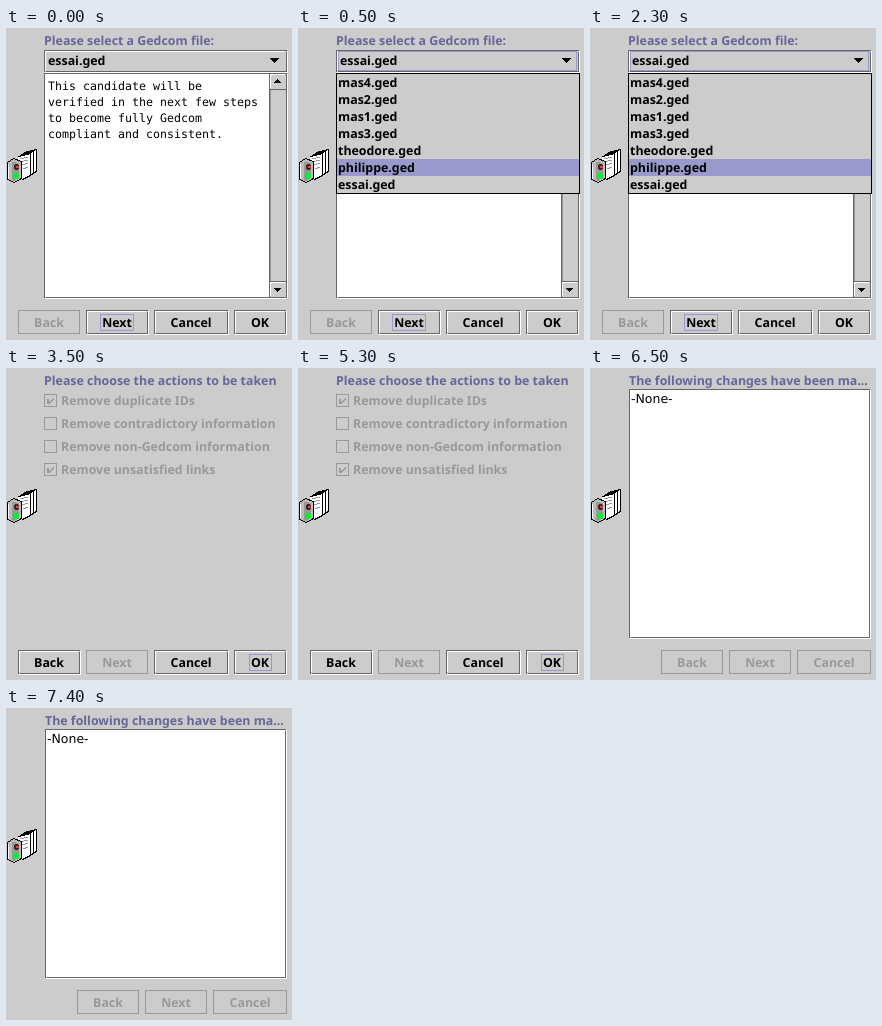
Recreate the animation shown at these times as an HTML page. Size 286x312 px, loop 8 s.

```html
<!DOCTYPE html>
<html lang="en">
<head>
<meta charset="utf-8">
<title>Gedcom wizard</title>
<style>
  html, body { margin: 0; width: 100%; height: 100%; overflow: hidden; background: #ccc; }
  svg { display: block; width: 286px; height: 312px; shape-rendering: crispEdges; }
  text { font: bold 12.4px "Noto Sans", "Open Sans", sans-serif; text-rendering: geometricPrecision; white-space: pre; }
  .mono { font: 11.63px "DejaVu Sans Mono", monospace; }
  .plain { font: 12.5px "DejaVu Sans", sans-serif; }
</style>
</head>
<body>
<svg id="stage" viewBox="0 0 286 312"></svg>
<script>
const LOOP = 8000;
const C = { face: '#ccc', dark: '#666', mid: '#999', label: '#669', select: '#99c', ink: '#000', white: '#fff' };
const stage = document.getElementById('stage');

function add(parent, tag, attrs, content = '') {
  const el = document.createElementNS('http://www.w3.org/2000/svg', tag);
  for (const key in attrs) el.setAttribute(key, attrs[key]);
  el.textContent = content;
  parent.append(el);
  return el;
}

const group = () => add(stage, 'g', {});
const fill = (g, x, y, width, height, color) => add(g, 'rect', { x, y, width, height, fill: color });
const frame = (g, x, y, w, h, stroke, color = 'none') =>
  add(g, 'rect', { x: x + .5, y: y + .5, width: w - 1, height: h - 1, stroke, fill: color });
const path = (g, d, color, stroke = 'none') => add(g, 'path', { d, fill: color, stroke });
const text = (g, x, y, str, color = C.ink, cls = '', anchor = 'start') =>
  add(g, 'text', { x, y, fill: color, class: cls, 'text-anchor': anchor }, str);

// Dark outline over a white copy offset by one pixel, with two softened corners
function etched(g, x, y, w, h, color = C.face) {
  frame(g, x + 1, y + 1, w, h, C.white);
  frame(g, x, y, w, h, C.dark, color);
  fill(g, x + 1, y + h - 1, 1, 1, C.face);
  fill(g, x + w - 1, y + 1, 1, 1, C.face);
}

// Etched box with a white inner edge at the top left
function raised(g, x, y, w, h) {
  etched(g, x, y, w, h);
  path(g, `M${x + 1.5} ${y + h - 2}V${y + 1.5}H${x + w - 2}`, 'none', C.white);
}

function button(g, x, w, str, enabled, focus = 0) {
  const y = 282, h = 24;
  if (enabled) raised(g, x, y, w, h);
  else frame(g, x, y, w, h, C.mid);
  if (focus) frame(g, Math.round(x + (w - focus) / 2), y + 4, focus, 17, C.select);
  text(g, x + w / 2, 299, str, enabled ? C.ink : C.mid, '', 'middle');
}

function scrollButton(g, y, up) {
  frame(g, 263, y, 18, 17, C.dark, C.face);
  path(g, `M264.5 ${y + 15}V${y + 1.5}H279`, 'none', C.white);
  path(g, up ? `M271 ${y + 6}l4 4h-8z` : `M267 ${y + 7}h8l-4 4z`, C.ink);
}

function checkbox(g, y, str, checked) {
  frame(g, 38, y, 13, 13, C.mid);
  if (checked) path(g, `M41 ${y + 5}v5h2l5 -5v-2l-5 5v-3z`, C.mid);
  text(g, 55, y + 11, str, C.mid);
}

function choosePage() {
  const g = group();
  text(g, 38, 17, 'Please select a Gedcom file:', C.label);
  raised(g, 38, 22, 243, 22);
  text(g, 42, 37, 'essai.ged');
  path(g, 'M263 30h10l-5 5z', C.ink);
  etched(g, 38, 45, 243, 225, C.white);
  fill(g, 263, 46, 17, 223, C.face);
  fill(g, 263, 46, 1, 223, C.dark);
  fill(g, 264, 46, 1, 223, C.mid);
  scrollButton(g, 45, true);
  scrollButton(g, 253, false);
  [
    'This candidate will be',
    'verified in the next few steps',
    'to become fully Gedcom',
    'compliant and consistent.'
  ].forEach((line, i) => text(g, 42, 62 + 16 * i, line, C.ink, 'mono'));
  button(g, 12, 62, 'Back', false);
  button(g, 80, 62, 'Next', true, 34);
  button(g, 148, 74, 'Cancel', true);
  button(g, 228, 52, 'OK', true);
  return g;
}

function popup() {
  const g = group(), chosen = 5;
  frame(g, 40, 23, 239, 20, C.select);
  frame(g, 38, 45, 244, 121, C.ink, C.face);
  ['mas4', 'mas2', 'mas1', 'mas3', 'theodore', 'philippe', 'essai'].forEach((name, i) => {
    const y = 46 + 17 * i;
    if (i === chosen) fill(g, 39, y, 242, 17, C.select);
    text(g, 40, y + 13, name + '.ged');
  });
  return g;
}

function actionsPage() {
  const g = group();
  text(g, 38, 17, 'Please choose the actions to be taken', C.label);
  checkbox(g, 26, 'Remove duplicate IDs', true);
  checkbox(g, 49, 'Remove contradictory information', false);
  checkbox(g, 72, 'Remove non-Gedcom information', false);
  checkbox(g, 95, 'Remove unsatisfied links', true);
  button(g, 12, 62, 'Back', true);
  button(g, 80, 62, 'Next', false);
  button(g, 148, 74, 'Cancel', true);
  button(g, 228, 52, 'OK', true, 23);
  return g;
}

function resultPage() {
  const g = group();
  text(g, 39, 17, 'The following changes have been ma...', C.label);
  etched(g, 39, 21, 241, 249, C.white);
  text(g, 41, 35, '-None-', C.ink, 'plain');
  button(g, 71, 62, 'Back', false);
  button(g, 139, 62, 'Next', false);
  button(g, 207, 74, 'Cancel', false);
  return g;
}

// Fanned pages beside a small traffic light
function icon() {
  const g = group();
  [[18, 121], [15, 123], [12, 125]].forEach(([x, y]) => {
    path(g, `M${x} ${y + 3}l12 -3v22l-8 4l-4 -3z`, C.white);
    path(g, `M${x + .5} ${y + 3.5}l12 -3v22l-8 4`, 'none', C.ink);
  });
  path(g, 'M14 131l8 -2M14 134l8 -2M16 137l6 -2M17 141l5 -2', 'none', C.mid);
  path(g, 'M1.5 134.5l6 -4l8 3v17l-7 4l-7 -3z', '#bbb', C.ink);
  path(g, 'M6 134l7 1v15l-5 3l-2 -1z', C.mid);
  path(g, 'M2.5 136v15', 'none', C.white);
  add(g, 'circle', { cx: 10.5, cy: 139, r: 3, fill: '#422' });
  fill(g, 10, 138, 3, 2, '#d44');
  add(g, 'circle', { cx: 10, cy: 148, r: 3, fill: '#0e3' });
}

fill(stage, 0, 0, 286, 312, C.face);
const scenes = [
  [choosePage(), 0, 3500],
  [popup(), 500, 3500],
  [actionsPage(), 3500, 6500],
  [resultPage(), 6500, LOOP]
];
icon();

const start = performance.now();
function draw(now) {
  const t = Math.max(0, now - start) % LOOP;
  for (const [g, from, to] of scenes) g.style.display = t >= from && t < to ? '' : 'none';
  requestAnimationFrame(draw);
}
draw(start);
</script>
</body>
</html>
```
